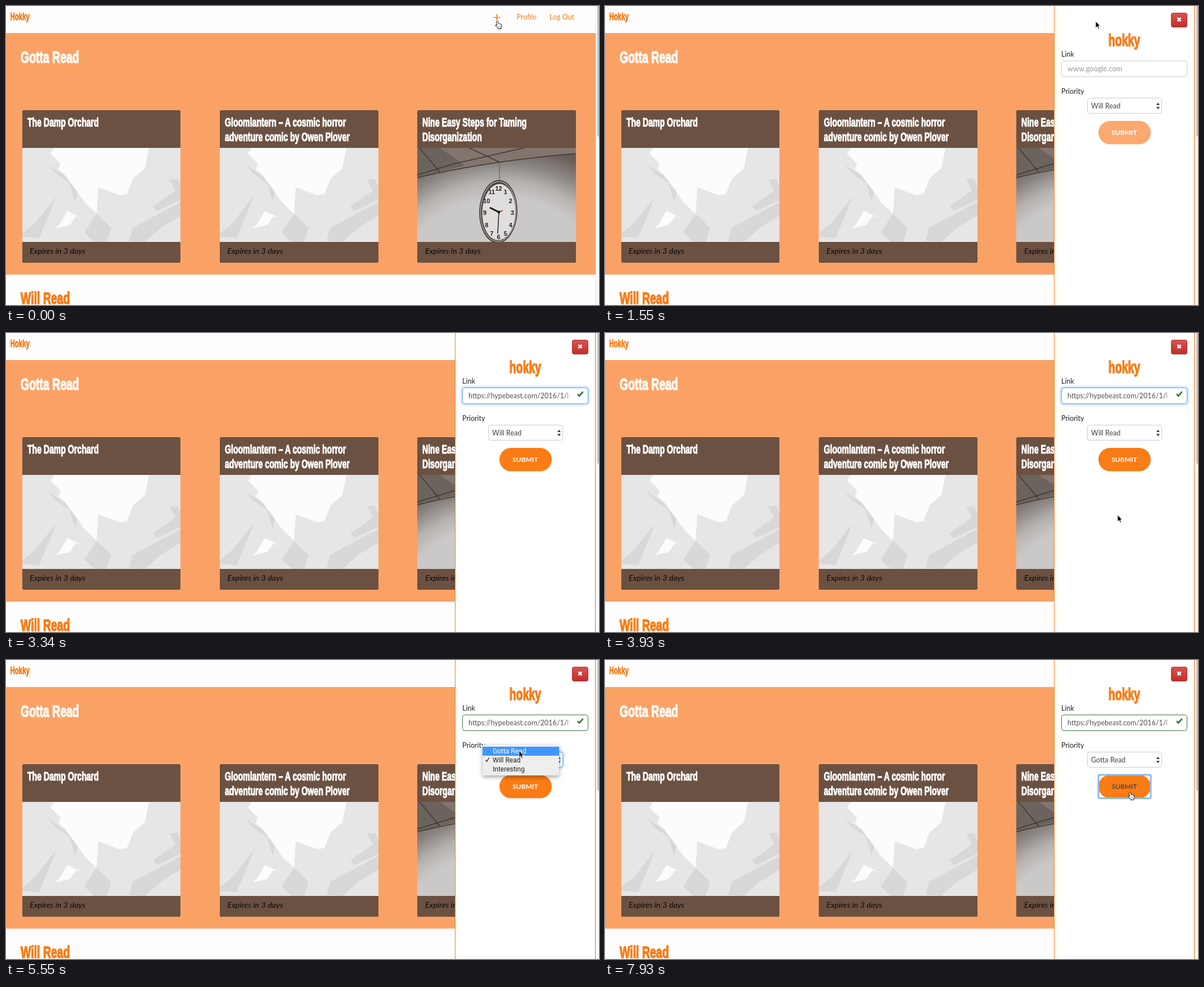
These frames come from a looping animation (1054x531 px, 8000 ms). An HTML page:

```html
<!DOCTYPE html>
<html lang="en">
<head>
<meta charset="utf-8">
<title>Reading list</title>
<style>
html, body { margin: 0; width: 100%; height: 100%; overflow: hidden; background: #fcfcfc; }
svg { display: block; }
text { font-family: Lato, sans-serif; font-size: 12.5px; white-space: pre; }
text.head { font-family: "Liberation Sans", Arial, sans-serif; font-weight: 700; stroke-width: .05em; }
text.menu { font-family: Roboto, sans-serif; font-size: 12px; }
</style>
</head>
<body>
<svg width="1054" height="531" viewBox="0 0 1054 531">
  <defs>
    <linearGradient id="red" x2="0" y2="1"><stop stop-color="#d9534f"/><stop offset="1" stop-color="#c12e2a"/></linearGradient>
    <radialGradient id="wall" gradientUnits="userSpaceOnUse" cx="150" cy="300" r="310">
      <stop offset=".68" stop-color="#cbc9c8"/><stop offset=".78" stop-color="#b5b1af"/>
      <stop offset=".88" stop-color="#8a8480"/><stop offset="1" stop-color="#625a55"/>
    </radialGradient>
    <filter id="glow" x="-20%" y="-60%" width="140%" height="220%"><feGaussianBlur stdDeviation="2"/></filter>
    <filter id="shade" x="-20%" y="-40%" width="140%" height="180%"><feDropShadow dx="0" dy="3" stdDeviation="3.5" flood-opacity=".35"/></filter>
  </defs>
  <g id="page"></g>
  <g id="panel"></g>
  <g id="bar">
    <rect x="1048" width="6" height="531" fill="#fafafa"/>
    <rect x="1048" width="1" height="531" fill="#e6e6e6"/>
    <rect x="1051" y="-4" width="5" height="236" rx="2" fill="#c2c2c2"/>
  </g>
  <g id="cursor"></g>
</svg>
<script>
const $ = id => document.getElementById(id);
const ORANGE = '#f97c16', PALE = '#faa266', BROWN = '#6b5142', GREEN = '#3c763d', BLUE = '#66afe9';

const rect = (x, y, w, h, fill, more = '') =>
  `<rect x="${x}" y="${y}" width="${w}" height="${h}" fill="${fill}" ${more}/>`;
const path = (d, fill, more = '') => `<path d="${d}" fill="${fill}" ${more}/>`;
const line = (d, color, width = 1, more = '') => path(d, 'none', `stroke="${color}" stroke-width="${width}" ${more}`);
const text = (x, y, s, fill = '#222', more = '') => `<text x="${x}" y="${y}" fill="${fill}" ${more}>${s}</text>`;
// Headings use one heavy condensed face throughout.
const head = (x, y, size, s, fill, anchor = 'start') =>
  `<text class="head" transform="translate(${x} ${y}) scale(.65 1)" style="font-size:${size}px" text-anchor="${anchor}" fill="${fill}" stroke="${fill}">${s}</text>`;
const shapes = (fill, list) => list.map(p => `<polygon points="${p}" fill="${fill}"/>`).join('');

function paper() {
  return rect(0, 0, 282, 167, '#e6e6e6') +
    shapes('#fcfcfc', [
      '57,0 225,0 218,36 197,54 186,82 173,84 135,70 132,117 112,98 76,48 64,38 68,28 50,10',
      '66,136 80,112 110,126 96,121 84,137 58,143']) +
    shapes('#d8d8d8', [
      '46,30 76,50 98,78 94,96 84,62 60,46',
      '0,152 24,132 60,86 50,112 30,160 0,158',
      '132,117 158,142 150,167 128,167 110,150',
      '190,165 196,142 282,96 282,120 246,142 218,167',
      '232,104 272,76 262,56 276,55 282,70 282,92 240,112']);
}

function clock() {
  let numbers = '';
  for (let n = 1; n <= 12; n++) {
    const a = n * Math.PI / 6;
    numbers += text(144.5 + 24.5 * Math.sin(a), 119 - 43 * Math.cos(a), n, '#222',
      'text-anchor="middle" style="font:700 11px \'Liberation Sans\',sans-serif"');
  }
  return rect(0, 0, 282, 167, 'url(#wall)') +
    path('M0 0H282V10Q120 24 0 53Z', '#81756d') +
    path('M0 0H40L85 31 0 53Z', '#6d635d') +
    line('M0 53Q120 24 282 10', '#3f3733', 1.5) +
    line('M4 0L40 43M92 0L146 25M0 48L66 28 190 0', '#3f3733', 1.5) +
    line('M146 25V60', '#5b524d') +
    '<g transform="rotate(2 144 113)"><ellipse cx="144" cy="113" rx="34" ry="56" fill="#474140"/>' +
    '<ellipse cx="144" cy="113" rx="31.5" ry="53" fill="none" stroke="#aaa5a2" stroke-width="1.5"/>' +
    '<ellipse cx="145" cy="114" rx="29.5" ry="50" fill="#e0dedd"/></g>' + numbers +
    line('M145 114L129 106', '#161414', 3) + line('M145 114L143 152', '#222', 1.5) +
    line('M143 115L152 111', '#b73527', 1.5) + '<circle cx="145" cy="114" r="2.5" fill="#241c1a"/>';
}

function card(column, lines, picture) {
  const exact = 28.6 + 351.4 * column;
  const x = Math.round(exact), w = Math.round(exact + 281.6) - x;
  return rect(x, 185, w, 271, BROWN, 'rx="2.5"') +
    lines.map((s, i) => head(x + 9, 214 + 26 * i, 21.7, s, '#fff')).join('') +
    `<svg x="${x}" y="252" width="${w}" height="167">${picture}</svg>` +
    text(exact + 13.5, 440, 'Expires in 3 days', '#0c0806', 'style="font-size:14.3px;font-style:italic"');
}

$('page').innerHTML = rect(0, 0, 1054, 531, '#fdfdfd') + rect(0, 48, 1054, 429, PALE) +
  head(7.5, 25, 17.7, 'Hokky', ORANGE) +
  line('M866.5 20.5H878.5M872.5 14.5V26.5', ORANGE, 1.7) +
  text(907.5, 23.5, 'Profile', ORANGE) + text(966, 23.5, 'Log Out', ORANGE) +
  head(26, 100.5, 30, 'Gotta Read', '#fff8f2') +
  card(0, ['The Damp Orchard'], paper()) +
  card(1, ['Gloomlantern – A cosmic horror', 'adventure comic by Owen Plover'], paper()) +
  card(2, ['Nine Easy Steps for Taming', 'Disorganization'], clock()) +
  head(26, 529, 30, 'Will Read', ORANGE);

const field = (x, y, w, h, border, glow) =>
  (glow ? rect(x - 1, y - 1, w + 2, h + 2, BLUE, 'rx="5" opacity=".7" filter="url(#glow)"') : '') +
  rect(x + .5, y + .5, w - 1, h - 1, '#fff', `rx="4" stroke="${border}"`);
const arrows = (x, y) => path(`M${x - 3} ${y - 1.5}h6l-3-4.5zM${x - 3} ${y + 1.5}h6l-3 4.5z`, '#444');
const cross = (x, y) => line(`M${x - 3} ${y - 3}l6 6m0-6l-6 6`, '#fff', 2.6);
const frame = (x, w) => rect(x + .5, -1, w - 1, 533, '#fff', `stroke="${ORANGE}"`);

function narrowPanel() {
  return frame(1023, 25) + '<svg x="1024" width="23" height="531" viewBox="1024 0 23 531">' +
    rect(1024, 12, 24, 26, 'url(#red)') + cross(1032, 23) +
    head(1025, 72, 30, 'hokky', ORANGE) +
    field(1026, 27, 30, 28, '#ccc') +
    text(1025, 18, 'Link') + text(1025, 81, 'Priority') +
    field(1030, 89, 12, 28, '#bbb') + arrows(1036, 103) +
    '<circle cx="1047" cy="150.5" r="21" fill="#fba970"/></svg>';
}

function menu(top) {
  return rect(847, 150, 136, 55, '#eeeeee', 'rx="4" filter="url(#shade)"') +
    rect(847, top ? 154 : 170, 136, 16, '#3f97fd') +
    ['Gotta Read', 'Will Read', 'Interesting'].map((s, i) =>
      text(865, 165.5 + 16 * i, s, i === (top ? 0 : 1) ? '#fff' : '#222', 'class="menu"')).join('') +
    line('M852.5 177.5l2 3 4-7', top ? '#222' : '#fff', 1.3);
}

function fullPanel(t, hover) {
  const pasted = t >= 3190, focused = t >= 2290 && t < 4070, valid = t >= 4070;
  const open = t >= 4810 && t < 6450, clicked = t >= 7930;
  const selectFocus = t >= 4810 && !clicked;
  return frame(798, 250) +
    rect(1006.5, 12.5, 28, 25, 'url(#red)', 'rx="3" stroke="#b92c28"') + cross(1020.5, 24) +
    head(923, 71, 30, 'hokky', ORANGE, 'middle') +
    text(811, 90, 'Link') +
    field(811, 97, 224, 29, valid ? GREEN : focused ? BLUE : '#ccc', focused) +
    '<svg x="822" y="98" width="177" height="27">' +
    (pasted ? text(0, 17.5, 'https://hypebeast.com/2016/1/hypebeast', '#555', 'style="font-size:12.5px"')
            : text(0, 17.5, 'www.google.com', '#999', 'style="font-size:12.8px"')) + '</svg>' +
    (focused && t < 2740 ? rect(822, 105, 1, 13, '#333') : '') +
    (pasted ? line('M1016 108.5l3.2 3.2 6.5-7.5', GREEN, 2.8) : '') +
    text(811, 156, 'Priority') +
    field(857, 163, 133, 28, selectFocus ? BLUE : '#ccc', selectFocus) +
    text(864, 181.5, t < 6450 ? 'Will Read' : 'Gotta Read', '#444') + arrows(983, 177.5) +
    rect(877, 204, 93, 41.5, pasted ? ORANGE : '#fba970', 'rx="20.7"') +
    text(923, 229, 'SUBMIT', hover ? '#333' : '#fff',
      `text-anchor="middle" style="font-size:12px;font-weight:${hover ? 400 : 700}"`) +
    (clicked ? rect(877, 204, 93, 41.5, 'none', 'rx="2" stroke="#86baf5" stroke-width="3"') : '') +
    (open ? menu(t >= 5550) : '');
}

const pointers = {
  arrow: path('M0 0V12L2.8 9.5 4.6 13.7 6.6 12.8 4.8 8.8H8.4Z', '#000', 'stroke="#fff" stroke-width=".9"'),
  hand: path('M3.5 1.2q1.3-.6 1.8.8L6.6 5.6q1-.7 1.8.3 1-.6 1.6.4 1.2-.4 1.6.8l.4 3.2q0 1.6-1 2.6V14.5H5.5L5 13Q3.5 11 1 9q-.6-1.2.6-1.5 1 0 2.2 1.2L2.6 2.6Q2.5 1.5 3.5 1.2Z',
    '#fff', 'stroke="#111"') + line('M6.5 9.5v3M8.3 9.5v3M10 9.5v3', '#555', .6),
  beam: line('M-2 -6.5Q0 -6.5 0 -5V5Q0 6.5 -2 6.5M2 -6.5Q0 -6.5 0 -5M0 5Q0 6.5 2 6.5M-1.5 2.5H1.5', '#222'),
  none: ''
};

// Screen updates: time, pointer, x, y
const steps = [
  [0, 'hand', 869, 26], [1200, 'hand', 869, 26], [1550, 'arrow', 872, 27],
  [1850, 'arrow', 874, 46], [2000, 'arrow', 877, 74], [2150, 'beam', 878, 101],
  [2290, 'beam', 878, 104], [2440, 'beam', 878, 103], [2740, 'beam', 878, 103],
  [3190, 'none', 0, 0], [3340, 'none', 0, 0], [3490, 'arrow', 679, 262],
  [3630, 'arrow', 760, 305], [3780, 'arrow', 868, 322], [3930, 'arrow', 911, 323],
  [4070, 'arrow', 911, 318], [4220, 'arrow', 913, 301], [4370, 'arrow', 914, 262],
  [4520, 'hand', 911, 212], [4660, 'arrow', 913, 182], [4810, 'arrow', 913, 179],
  [5110, 'arrow', 913, 178], [5410, 'arrow', 913, 171], [5550, 'arrow', 912, 161],
  [6450, 'arrow', 912, 161], [6600, 'hand', 914, 215], [6740, 'arrow', 934, 296],
  [6890, 'arrow', 941, 330], [7190, 'arrow', 940, 318], [7340, 'arrow', 937, 276],
  [7490, 'hand', 930, 240], [7630, 'hand', 929, 236], [7780, 'hand', 929, 234],
  [7930, 'hand', 929, 234]
];

let shown;
function draw(now) {
  const t = now % 8000;
  const step = steps.filter(s => s[0] <= t).pop();
  if (step !== shown) {
    shown = step;
    const [start, kind, x, y] = step;
    const hover = kind === 'hand' && y > 200;
    $('panel').innerHTML = start < 1200 ? '' : start < 1550 ? narrowPanel() : fullPanel(start, hover);
    $('cursor').innerHTML = `<g transform="translate(${x} ${y})">${pointers[kind]}</g>`;
  }
}
const origin = performance.now();
function tick() {
  draw(performance.now() - origin);
  requestAnimationFrame(tick);
}
tick();
</script>
</body>
</html>
```
